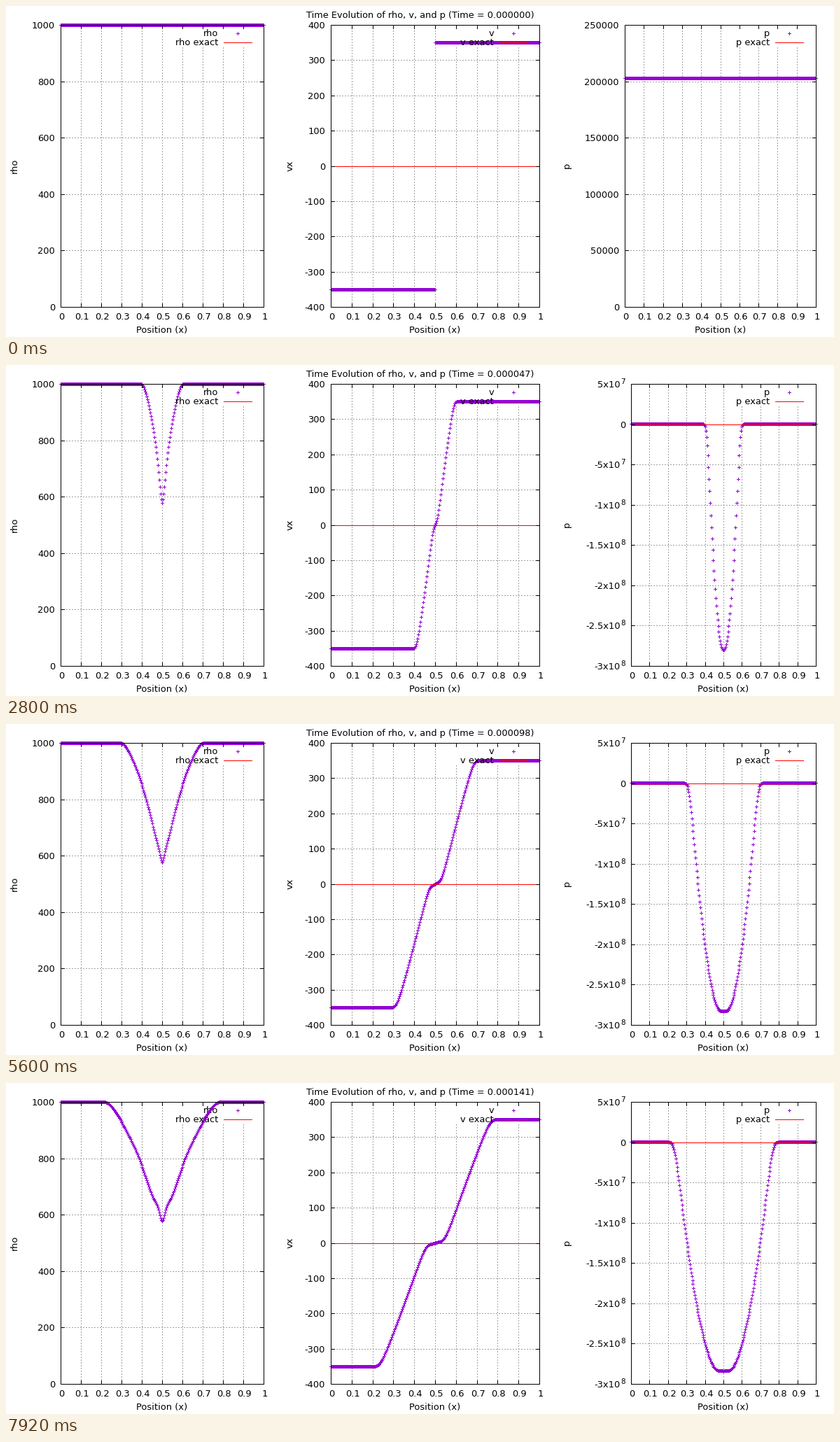
A matplotlib script for the animation above (8 s loop, 1183x473 px).

```python
import math

import matplotlib.pyplot as plt
import numpy as np
from matplotlib.animation import FuncAnimation
from matplotlib.markers import MarkerStyle

W, H, DPI = 1183, 473, 64
PX = 72 / DPI                      # points per pixel
FRAMES, INTERVAL = 100, 80
TOP, BOTTOM = 27, 430
KEY_TOP, KEY_BOTTOM = 32, 59
PURPLE, RED, GRID = "#9400d3", "#ff0000", "#a0a0a0"
PLUS = MarkerStyle("+", capstyle="projecting")

# Stiffened gas, two water streams pulled apart
CELLS, CFL = 300, 0.8
GAMMA, STIFF = 7.15, 3e8
RHO0, SPEED, P0 = 1000.0, 350.0, 202650.0
MIX = 0.4                          # share of the two-wave flux, smooths the contact
SETTLED, LOW_P = 12, -2.6e8        # pressure axis is steady from here on

plt.rcParams["font.family"] = "DejaVu Sans"


# ---------- flow solver ----------
def primitive(q):
    rho, u = q[0], q[1] / q[0]
    pres = (GAMMA - 1) * (q[2] - 0.5 * rho * u * u)   # p + STIFF
    pres = np.maximum(pres, 1.0)
    return rho, u, pres, np.sqrt(GAMMA * pres / rho)


def flux(q):
    _, u, pres, _ = primitive(q)
    return np.array([q[1], q[1] * u + pres, u * (q[2] + pres)])


def star_flux(q, s, mid):
    """Flux behind the outer wave s, next to a contact moving at mid."""
    rho, u, pres, _ = primitive(q)
    dens = rho * (s - u) / (s - mid)
    energy = q[2] / rho + (mid - u) * (mid + pres / (rho * (s - u)))
    return flux(q) + s * (np.array([dens, dens * mid, dens * energy]) - q)


def face_flux(ql, qr):
    rl, ul, pl, cl = primitive(ql)
    rr, ur, pr, cr = primitive(qr)
    sl = np.minimum(ul - cl, ur - cr)
    sr = np.maximum(ul + cl, ur + cr)
    ml, mr = rl * (sl - ul), rr * (sr - ur)
    mid = (pr - pl + ml * ul - mr * ur) / (ml - mr)
    three = np.where(mid >= 0, star_flux(ql, sl, mid), star_flux(qr, sr, mid))
    two = (sr * flux(ql) - sl * flux(qr) + sl * sr * (qr - ql)) / (sr - sl)
    return MIX * two + (1 - MIX) * three


def simulate():
    dx = 1 / CELLS
    x = (np.arange(CELLS) + 0.5) * dx
    u = np.where(x < 0.5, -SPEED, SPEED)
    rho = np.full(CELLS, RHO0)
    q = np.array([rho, rho * u, (P0 + STIFF) / (GAMMA - 1) + 0.5 * rho * u * u])
    t, states = 0.0, []
    for n in range(FRAMES):
        rho, u, pres, c = primitive(q)
        states.append((t, rho.copy(), u.copy(), pres - STIFF))
        dt = CFL * dx / np.max(np.abs(u) + c)
        if n < 4:
            dt *= 0.2
        wide = np.pad(q, ((0, 0), (1, 1)), mode="edge")
        f = face_flux(wide[:, :-1], wide[:, 1:])
        q = q - dt / dx * (f[:, 1:] - f[:, :-1])
        t += dt
    return x, states


# ---------- axis scaling ----------
def tick_step(span):
    power = 10.0 ** math.floor(math.log10(span))
    norm = span / power
    room = 20 / norm
    for limit, step in ((40, 0.05), (20, 0.1), (10, 0.2), (4, 0.5), (1, 1), (0.5, 2)):
        if room > limit:
            return step * power
    return math.ceil(norm) * power


def pressure_axis(n, p):
    lo = min(p.min(), LOW_P if n >= SETTLED else 0.0)
    hi = max(p.max(), 0.0)
    step = tick_step(hi - lo)
    lo, hi = math.floor(lo / step) * step, math.ceil(hi / step) * step
    return (893 if lo < 0 else 884), lo, hi, step


def to_y(v, lo, hi):
    return BOTTOM - (v - lo) / (hi - lo) * (BOTTOM - TOP)


def to_x(v, left, right):
    return left + v * (right - left)


def center(v):
    """Middle of the pixel nearest to v."""
    return math.floor(v + 0.5) + 0.5


# ---------- drawing ----------
fig = plt.figure(figsize=(W / DPI, H / DPI), dpi=DPI, facecolor="white")
ax = fig.add_axes([0, 0, 1, 1])
ax.set_xlim(0, W)
ax.set_ylim(H, 0)
ax.axis("off")


def text(x, y, s, ha="center", size=13, z=6, **kw):
    kw.setdefault("va", "baseline")
    return ax.text(x, y, s, ha=ha, fontsize=size * PX, color="black", zorder=z, **kw)


def stroke(xs, ys, color, z):
    return ax.plot(xs, ys, color=color, lw=PX, zorder=z,
                   solid_capstyle="butt", snap=False)[0]


def crosses(xs, ys):
    return ax.plot(xs, ys, ls="none", marker=PLUS, color=PURPLE,
                   ms=4 * PX, mew=PX, zorder=3)[0]


def tick_label(right, y, v):
    s = f"{v:.6g}"
    if "e" not in s:
        return [text(right, y + 4.5, s, "right")]
    mant, exp = s.split("e")
    return [text(right - 7, y + 4.5, f"{mant}x10", "right"),
            text(right, y - 0.5, str(int(exp)), "right", 10.4)]


def frame_axes(left, right, lo, hi, step, key_left):
    """Grid, ticks, labels, border and the zero line of one panel."""
    made = []

    def segs(fn, at, a, b, color, z, style="-"):
        made.append(fn(at, a, b, colors=color, linewidths=PX, linestyles=style,
                       zorder=z, snap=False))

    count = round((hi - lo) / step)
    values = [lo + k * step for k in range(count + 1)]
    ys = [center(to_y(v, lo, hi)) for v in values]
    xs = [center(to_x(k / 10, left, right)) for k in range(11)]
    l, r, t, b = left, right + 1, TOP, BOTTOM + 1
    dots = (0, (2, 2))

    segs(ax.hlines, ys[1:-1], l, r, GRID, 1, dots)
    plain = [x for x in xs[1:-1] if x < key_left]
    under = [x for x in xs[1:-1] if x >= key_left]
    segs(ax.vlines, plain, t, b, GRID, 1, dots)
    segs(ax.vlines, under, KEY_BOTTOM, b, GRID, 1, dots)
    segs(ax.vlines, under, t, KEY_TOP, GRID, 1, dots)

    segs(ax.hlines, ys, l, l + 6, "black", 5)
    segs(ax.hlines, ys, r - 6, r, "black", 5)
    segs(ax.vlines, xs, t, t + 6, "black", 5)
    segs(ax.vlines, xs, b - 6, b, "black", 5)
    segs(ax.hlines, [t + 0.5, b - 0.5], l, r, "black", 5)
    segs(ax.vlines, [l + 0.5, r - 0.5], t, b, "black", 5)

    zero = center(to_y(0, lo, hi))
    made.append(stroke([l, r], [zero, zero], RED, 4))
    for v, y in zip(values, ys):
        made += tick_label(left - 8, y, 0 if abs(v) < step / 2 else v)
    for k, x in enumerate(xs):
        made.append(text(x + 1, 447.5, f"{k / 10:g}"))
    made.append(text((left + right) / 2, 466.5, "Position (x)"))
    return made


def key(name, end):
    text(end, 43, name, "right", z=2)
    crosses([end + 28], [39])
    text(end, 56.3, name + " exact", "right", z=4)
    stroke([end + 8, end + 49], [52.5, 52.5], RED, 4)


X, STATES = simulate()
RHO_BOX, V_BOX, P_RIGHT = (78, 368), (464, 762), 1157

frame_axes(*RHO_BOX, 0, 1000, 200, 235)
frame_axes(*V_BOX, -400, 400, 100, 635)
for name, end, label, lx in (("rho", 303, "rho", 12),
                             ("v", 697, "vx", 406),
                             ("p", 1091, "p", 801)):
    key(name, end)
    text(lx, 228, label, va="center", rotation=90)

title = text(429, 17, "", "left", 12.9)
rho_dots = crosses(to_x(X, *RHO_BOX), X)
v_dots = crosses(to_x(X, *V_BOX), X)
p_dots = crosses(X, X)
shown = {"axis": None, "parts": []}


def update(n):
    t, rho, u, p = STATES[n]
    title.set_text(f"Time Evolution of rho, v, and p (Time = {t:.6f})")
    rho_dots.set_ydata(to_y(rho, 0, 1000))
    v_dots.set_ydata(to_y(u, -400, 400))

    axis = pressure_axis(n, p)
    left, lo, hi, step = axis
    if axis != shown["axis"]:
        for part in shown["parts"]:
            part.remove()
        shown["parts"] = frame_axes(left, P_RIGHT, lo, hi, step, 1035)
        shown["axis"] = axis
    p_dots.set_data(to_x(X, left, P_RIGHT), to_y(p, lo, hi))
    return title, rho_dots, v_dots, p_dots


anim = FuncAnimation(fig, update, frames=FRAMES, interval=INTERVAL,
                     repeat=True, repeat_delay=0, blit=False)
plt.show()
```
